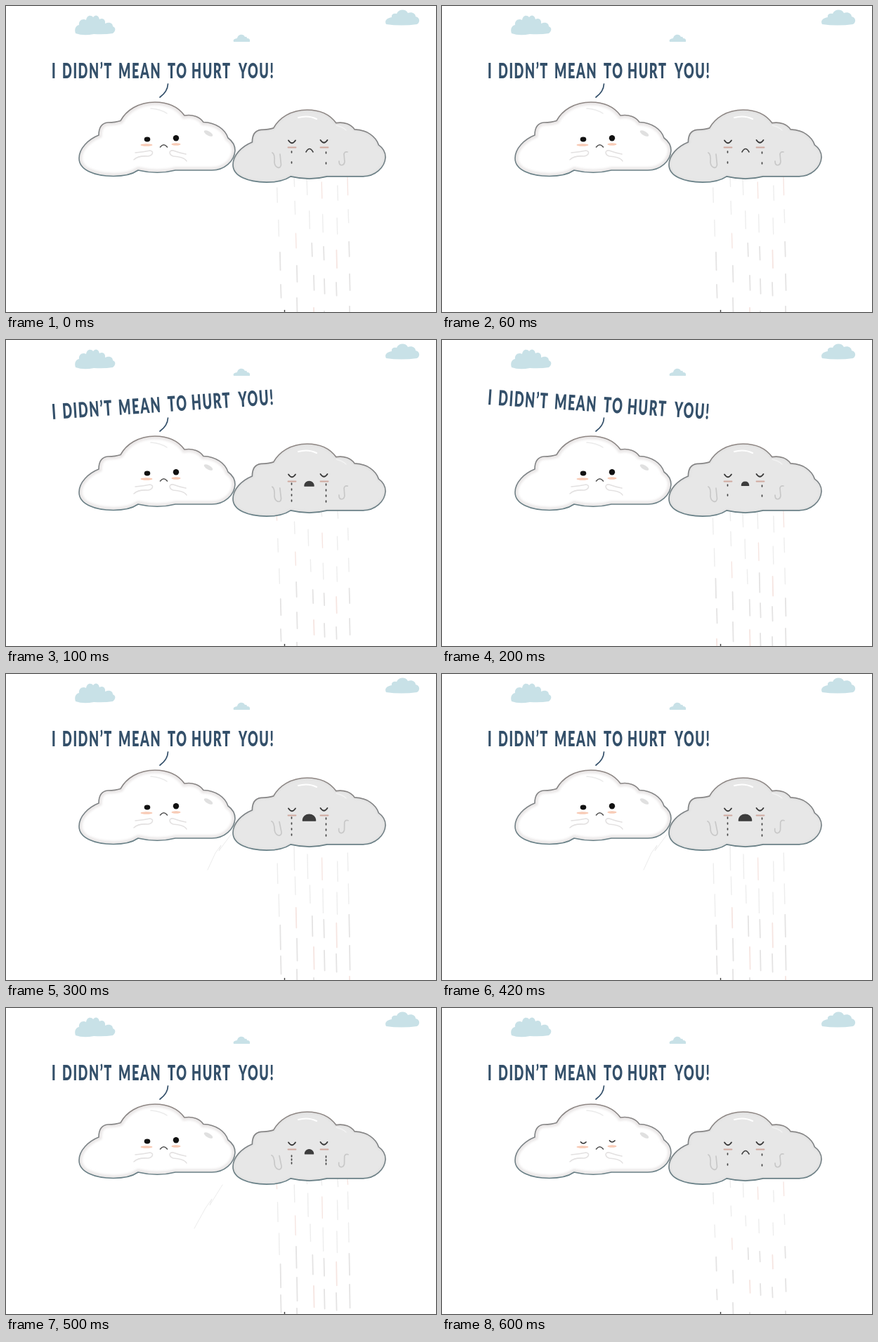
An HTML page for the animation above (0.7 s loop, 612 px wide and 436 px high).

```html
<!DOCTYPE html>
<html lang="en">
<head>
<meta charset="utf-8">
<title>Sorry cloud</title>
<style>
html, body { margin: 0; width: 100%; height: 100%; overflow: hidden; background: #fff; }
svg { display: block; width: 100vw; height: 100vh; }
text { font: 900 30px Lato, "Open Sans", sans-serif; letter-spacing: 2.6px; fill: #34506a; }
.line { fill: none; stroke-linecap: round; stroke-linejoin: round; }
</style>
</head>
<body>
<svg viewBox="0 0 612 436" xmlns="http://www.w3.org/2000/svg">
  <defs>
    <path id="cloud" d="M104 217 C104 203 117 190 132 184 C132 175 135 167 145 166 Q156 166 163 163.500
      C171 149 188 137 212 137 C232 137 246 145 254 156 C266 154 276 158 281 165.500
      C299 166 312 176 316 188 C323 193 326 199 326 206 C325 221 311 234 293 234
      L241 234 C222 239 205 238 188 234 C178 241 166 242.500 153 242.500 C126 242 104 234 104 217Z"/>
    <clipPath id="inside"><use href="#cloud"/></clipPath>
    <filter id="soft"><feGaussianBlur stdDeviation="1.600"/></filter>
    <linearGradient id="edge" x1="0" y1="0" x2="0" y2="1">
      <stop offset="0" stop-color="#8f8784"/>
      <stop offset=".5" stop-color="#7e8386"/>
      <stop offset="1" stop-color="#667f86"/>
    </linearGradient>
  </defs>

  <g fill="#c8e1e7">
    <path d="M99 39 C97 33 99 28 104 27 C103 21 109 17 114 20 C115 13 121 12 124 16 C128 11 132 14 133 19
      C138 16 142 20 141 25 C148 22 152 25 152 29 C157 31 156 36 152 39 Q140 41 125 40 Q110 43 99 39Z"/>
    <path d="M324 51 Q322 47 329 46 C330 40 338 39 340 44 Q343 43 343 46 Q348 46 347 51Z"/>
    <path d="M541 26 C538 20 543 17 549 16 C548 11 553 10 556 11 C559 4 569 4 572 10
      C578 8 583 11 583 15 C589 16 590 23 585 26 Q563 29 541 26Z"/>
  </g>

  <g id="speech"></g>
  <path class="line" d="M230.500 111 Q230 122 219 130" stroke="#34506a" stroke-width="1.700"/>

  <use href="#cloud" fill="#fff"/>
  <g clip-path="url(#inside)">
    <use href="#cloud" fill="none" stroke="#ebe8e8" stroke-width="9" filter="url(#soft)"/>
  </g>
  <use href="#cloud" fill="none" stroke="url(#edge)" stroke-width="1.600"/>
  <path class="line" d="M206 146 Q220 147 229 153" stroke="#ebebeb" stroke-width="1.500"/>
  <ellipse cx="288" cy="181.500" rx="7" ry="3" transform="rotate(30 288 181.500)" fill="#e0e0e0"/>
  <g class="line" stroke="#e3e1e1" stroke-width="1.600">
    <path d="M184 209 Q196 208 205 206 C211 207 209 213 202 214 Q188 213 182 219"/>
    <path d="M256 211 Q246 209 238 206 C231 205 232 212 238 214 Q254 215 257 221"/>
  </g>
  <g fill="#f8cbb6">
    <ellipse cx="200" cy="198" rx="8.500" ry="1.700"/>
    <ellipse cx="242" cy="197" rx="6.500" ry="1.700"/>
  </g>
  <path class="line" d="M219.500 201 Q224.500 194.500 229.500 201" stroke="#555" stroke-width="1.600"/>
  <g id="open" fill="#111">
    <ellipse cx="201" cy="190" rx="4.300" ry="3.400"/>
    <circle cx="242" cy="188.300" r="4.200"/>
  </g>
  <path id="shut" class="line" d="M197.500 191 Q201 195 205 191 M238.500 189 Q242 193 246 189" stroke="#333" stroke-width="1.700"/>

  <path id="bolt" class="line" stroke="#ececec" stroke-width="1"/>
  <g id="rain" class="line"></g>
  <path d="M396.500 433V436" stroke="#444" stroke-width="1.400"/>

  <g transform="translate(221.300 14) scale(.978)">
    <use href="#cloud" fill="#e7e7e7"/>
    <g clip-path="url(#inside)">
      <use href="#cloud" fill="none" stroke="#dedede" stroke-width="4" filter="url(#soft)"/>
    </g>
    <use href="#cloud" fill="none" stroke="url(#edge)" stroke-width="1.700"/>
  </g>
  <path class="line" d="M416 159 Q430 155 442 161" stroke="#fff" stroke-width="2"/>
  <path class="line" d="M470 170 Q479 172 484 177" stroke="#f2f2f2" stroke-width="1.500"/>
  <g class="line" stroke="#c8c8c8" stroke-width="1.700">
    <path id="armL" d="M379 209 Q383 211 382 223 C383 231 391 233 391.500 226 L390 211"/>
    <path id="armR" d="M486 208 Q482 207 481 211 L482 222 C481 228 474 229 474 221"/>
  </g>
  <path class="line" d="M401.500 201.500H412.500 M447.500 201.500H458.500" stroke="#cfa99f" stroke-width="1.800"/>
  <path class="line" d="M402 191.500 Q407 199 412 191.500 M447.500 191 Q452.500 198.500 457.500 191" stroke="#3a3a3a" stroke-width="1.800"/>
  <path id="tears" class="line" stroke="#444" stroke-width="1.700"/>
  <path id="mouth" class="line" stroke="#3d3d3d" stroke-width="1.600"/>
</svg>
<script>
const el = id => document.getElementById(id);
const LOOP = 700;

// tilt: speech angle; gape: half-width of the mouth; tears: [top, bottom, gap];
// fall, gap, drop: rain offset, spacing and length; lift: arm angle
const poses = [
  { from: 0,   tilt: 0,    gape: 0,   tears: [207, 223, 15], fall: 0,  gap: 46, drop: 22, lift: 0 },
  { from: 100, tilt: -3.8, gape: 6.5, tears: [204, 231, 8],  fall: 24, gap: 43, drop: 20, lift: 1 },
  { from: 200, tilt: 3.8,  gape: 5,   tears: [206, 222, 14], fall: 38, gap: 43, drop: 24, lift: 0 },
  { from: 300, tilt: 0,    gape: 9,   tears: [204, 230, 8],  fall: 11, gap: 44, drop: 30, lift: 6, bolt: "M320 229 L303 252 L306 244 L298 255 L287 279" },
  { from: 500, tilt: 0,    gape: 6,   tears: [210, 222, 5],  fall: 18, gap: 44, drop: 29, lift: 6, bolt: "M308 252 L290 281 L293 272 L284 285 L268 314" },
  { from: 600, tilt: 0,    gape: 0,   tears: [207, 223, 15], fall: 4,  gap: 46, drop: 17, lift: 0, blink: true }
];

// rain columns: x at the top, x at the bottom, first drop
const columns = [[385, 391, 259], [410, 414, 278], [428, 438, 246], [449, 453, 251], [472, 470, 256], [486, 489, 244]];

const words = [["I", 65], ["DIDN'T", 80], ["MEAN", 160], ["TO", 230], ["HURT", 264], ["YOU!", 331]];
el("speech").innerHTML = words.map(([word, x]) =>
  `<text transform="translate(${x} 102.500) scale(.605 1)">${word.replace("'", "’")}</text>`).join("");

function rain({ fall, gap, drop }) {
  let out = "";
  columns.forEach(([top, bottom, first], c) => {
    const start = 250 + (first - 250 + fall + gap) % gap - gap;
    for (let y = start, n = 0; y < 436; y += gap, n++) {
      const y1 = Math.max(y, 244), y2 = y + drop * (0.85 + 0.3 * ((c * 3 + n * 5) % 4) / 3);
      if (y2 < 250) continue;
      const x = top + (bottom - top) * Math.min(1, (y1 - 244) / 130);
      const low = y1 > 330;
      const color = (c + n * 2) % 5 ? (low ? "#e4e3e3" : "#ededed") : "#f6e5e1";
      out += `<path d="M${x} ${y1}L${x + 0.6} ${y2}" stroke="${color}" stroke-width="${low ? 1.8 : 1.4}"/>`;
    }
  });
  return out;
}

function tears([top, bottom, gap]) {
  let d = "";
  for (const x of [406.5, 455.5])
    for (let y = top; y <= bottom; y += gap) d += `M${x} ${y + (x > 450 ? 1 : 0)}v1.800`;
  return d;
}

function mouth(w) {
  if (!w) return "M427 208 Q432 199 437 208";
  const base = 205 + w * 0.45, top = base - w * 1.3;
  return `M${431.5 - w} ${base} C${432 - w} ${top} ${431 + w} ${top} ${431.5 + w} ${base}Z`;
}

function show(pose) {
  el("speech").setAttribute("transform", `rotate(${pose.tilt} 224 92)`);
  el("open").style.display = pose.blink ? "none" : "";
  el("shut").style.display = pose.blink ? "" : "none";
  el("bolt").setAttribute("d", pose.bolt || "");
  el("rain").innerHTML = rain(pose);
  el("tears").setAttribute("d", tears(pose.tears));
  el("mouth").setAttribute("d", mouth(pose.gape));
  el("mouth").style.fill = pose.gape ? "#3d3d3d" : "none";
  el("armL").setAttribute("transform", `rotate(${-pose.lift} 386 220)`);
  el("armR").setAttribute("transform", `rotate(${pose.lift} 479 218)`);
}

let current;
const begin = performance.now();
function tick() {
  const t = (performance.now() - begin) % LOOP;
  const pose = poses.findLast(p => p.from <= t);
  if (pose !== current) show(current = pose);
  requestAnimationFrame(tick);
}
tick();
</script>
</body>
</html>
```
